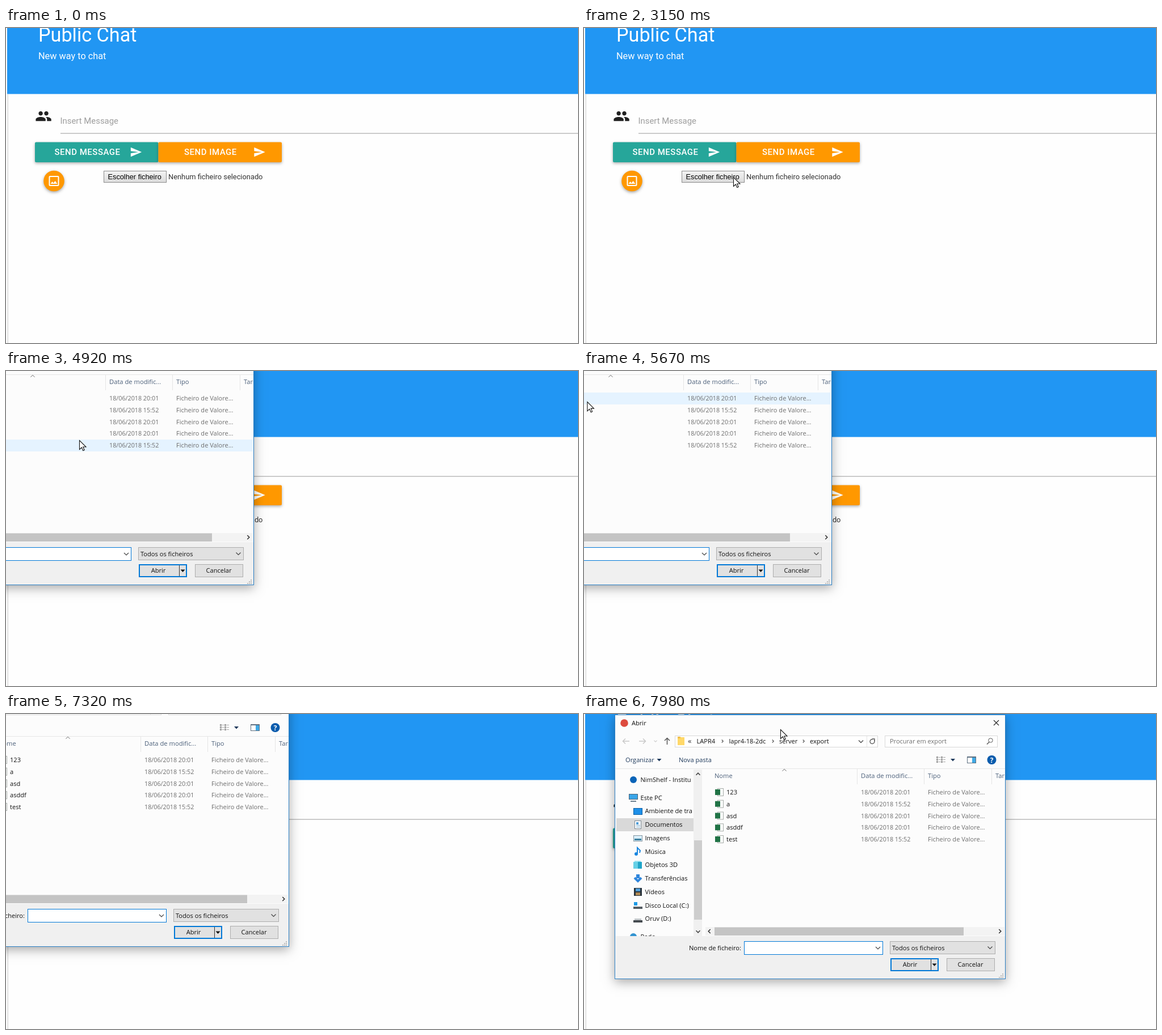
Recreate the animation shown at these times as an HTML page with a canvas. Size 1008 by 556 pixels, loop 8000 ms.

```html
<!DOCTYPE html>
<html lang="pt">
<head>
<meta charset="utf-8">
<title>Public Chat</title>
<style>
  html, body { margin: 0; width: 100%; height: 100%; overflow: hidden; background: #fefefe; }
  canvas { display: block; }
</style>
</head>
<body>
<canvas id="stage" width="1008" height="556"></canvas>
<script>
const ctx = document.getElementById('stage').getContext('2d');
const LOOP = 8000, STEP = 30;
const ROBOTO = 'Roboto, sans-serif', ARIAL = '"Liberation Sans", sans-serif', UI = '"Open Sans", sans-serif';
const ORANGE = '#ff9800', TEAL = '#26a69a', ACCENT = '#0078d7';

// Keys are [time, x, y]
const POINTER = [
  [90, 1006, 46], [210, 895, 108], [390, 706, 181], [450, 638, 213], [510, 584, 228],
  [570, 529, 241], [630, 481, 249], [750, 375, 258], [870, 308, 257], [900, 309, 245],
  [1020, 316, 229], [1200, 320, 220], [2610, 320, 220], [2730, 308, 238], [2880, 284, 256],
  [3150, 263, 263], [3390, 256, 266], [3480, 260, 267], [3750, 336, 289], [3960, 336, 289],
  [4440, 230, 187], [4620, 230, 187], [4920, 129, 122], [5160, 52, 88], [5400, 8, 70],
  [5430, 8, 70], [5640, 6, 52], [5850, 2, 67], [6480, 2, 67], [6810, 24, -22], [7080, 40, -63]
];
const WINDOW = [
  [7080, -306, -90], [7200, -288, -78], [7320, -244, -57], [7350, -230, -53], [7440, -164, -31],
  [7560, -90, -17], [7710, -28, -8], [7860, -1, -2], [7920, -1, -2], [7980, 0, 0]
];

const ICON = {
  send: new Path2D('M2 21L23 12 2 3v7l15 2-15 2z'),
  group: new Path2D('M16 11c1.66 0 3-1.34 3-3s-1.34-3-3-3-3 1.34-3 3 1.34 3 3 3zm-8 0c1.66 0 3-1.34 3-3s-1.34-3-3-3-3 1.34-3 3 1.34 3 3 3zm0 2c-2.33 0-7 1.17-7 3.5V19h14v-2.5c0-2.33-4.67-3.5-7-3.5zm8 0c-.3 0-.62 0-.97.05C16.2 13.9 17 15 17 16.5V19h6v-2.5c0-2.33-4.67-3.5-7-3.5z'),
  image: new Path2D('M5 3h14a2 2 0 0 1 2 2v14a2 2 0 0 1-2 2H5a2 2 0 0 1-2-2V5a2 2 0 0 1 2-2zM5 5v14h14V5zM14.1 11.9l-3 3.9L9 13.1 6 17h12z'),
  arrow: new Path2D('M.5.5V16.5L4.3 13L6.8 18.6L9.2 17.5L6.8 12H12Z'),
  hand: new Path2D('M-1.8 1.5Q0-1 1.8 1.5V8Q3.2 6.5 4.5 8.5Q6 7 7.3 9.2Q9 8 9.5 10.5V15Q9.5 18 8 20V23H-1.5V20.5L-6.5 14.5Q-7 12-4.5 12.5L-1.8 14.5Z')
};

const clamp = v => Math.max(0, Math.min(1, v));
const ramp = (t, from, to) => clamp((t - from) / (to - from));

function along(keys, t) {
  if (t <= keys[0][0]) return keys[0].slice(1);
  for (let i = 1; i < keys.length; i++) {
    const [t0, x0, y0] = keys[i - 1], [t1, x1, y1] = keys[i];
    if (t <= t1) {
      const p = (t - t0) / (t1 - t0);
      return [x0 + (x1 - x0) * p, y0 + (y1 - y0) * p];
    }
  }
  return keys[keys.length - 1].slice(1);
}

function text(s, x, y, color = '#111', size = 11.1, family = UI, weight = 400, align = 'left') {
  ctx.font = `${weight} ${size}px ${family}`;
  ctx.textAlign = align;
  ctx.fillStyle = color;
  ctx.fillText(s, x, y);
}

function box(x, y, w, h, fill, border) {
  if (fill) { ctx.fillStyle = fill; ctx.fillRect(x, y, w, h); }
  if (border) { ctx.strokeStyle = border; ctx.lineWidth = 1; ctx.strokeRect(x + .5, y + .5, w - 1, h - 1); }
}

function disc(x, y, r, fill) {
  ctx.fillStyle = fill;
  ctx.beginPath();
  ctx.arc(x, y, r, 0, 7);
  ctx.fill();
}

function line(color, width, ...p) {
  ctx.strokeStyle = color;
  ctx.lineWidth = width;
  ctx.beginPath();
  for (let i = 0; i < p.length; i += 2) ctx.lineTo(p[i], p[i + 1]);
  ctx.stroke();
}

// dir: 0 down, 1 left, 2 up, 3 right
function chevron(x, y, dir, r = 4, color = '#444', width = 1.2) {
  ctx.save();
  ctx.translate(x, y);
  ctx.rotate(dir * Math.PI / 2);
  line(color, width, -r, -r / 2, 0, r / 2, r, -r / 2);
  ctx.restore();
}

function caret(x, y, color = '#111') {
  ctx.fillStyle = color;
  ctx.beginPath();
  ctx.moveTo(x - 4, y - 2); ctx.lineTo(x + 4, y - 2); ctx.lineTo(x, y + 2.5);
  ctx.fill();
}

function icon(path, x, y, scale, color) {
  ctx.save();
  ctx.translate(x, y);
  ctx.scale(scale, scale);
  ctx.fillStyle = color;
  ctx.fill(path, 'evenodd');
  ctx.restore();
}

function shadow(alpha, blur, dy) {
  ctx.shadowColor = `rgba(0,0,0,${alpha})`;
  ctx.shadowBlur = blur;
  ctx.shadowOffsetY = dy;
}

function pageButton(x, label, labelX, color, lift) {
  ctx.save();
  shadow(.32 + .1 * lift, 5 + 6 * lift, 2 + 2 * lift);
  ctx.fillStyle = color;
  ctx.beginPath();
  ctx.roundRect(x, 201.5, 217.5, 35.5, 2);
  ctx.fill();
  ctx.restore();
  ctx.letterSpacing = '0.5px';
  text(label, labelX, 224.3, '#fff', 15, ROBOTO, 500);
  ctx.letterSpacing = '0px';
  icon(ICON.send, x + 167, 208, .92, '#fff');
}

function ripple(t) {
  const p = ramp(t, 1800, 2310);
  if (p <= 0 || p >= 1) return;
  ctx.save();
  ctx.beginPath();
  ctx.rect(268.5, 201.5, 217.5, 35.5);
  ctx.clip();
  disc(320, 222, 10 + 200 * (1 - (1 - p) ** 2), `rgba(255,255,255,${.4 * (1 - p)})`);
  ctx.restore();
}

function drawPage(t) {
  box(0, 0, 1008, 556, '#fefefe');
  box(2, 117, 2, 439, '#e6e6e6');
  box(4, 117, 1, 439, '#f5f5f5');
  box(2, 0, 1006, 116.5, '#2196f3');
  text('Public Chat', 57, 24, '#fff', 34.2, ROBOTO);
  text('New way to chat', 57, 55, '#fff', 16.3, ROBOTO);
  icon(ICON.group, 51.2, 140.8, 1.24, '#212121');
  text('Insert Message', 95.5, 169, '#9e9e9e', 14.9, ROBOTO);
  box(96, 185.5, 912, 1, '#9a9a9a');

  const lift = ramp(t, 960, 1200) - ramp(t, 2730, 2970);
  pageButton(51, 'SEND MESSAGE', 85.5, TEAL, 0);
  pageButton(268.5, 'SEND IMAGE', 314, ORANGE, lift);
  ripple(t);

  ctx.save();
  shadow(.35, 5, 2);
  disc(84.5, 270, 18.3, ORANGE);
  ctx.restore();
  icon(ICON.image, 72.5, 258, 1, '#fff');

  const face = ctx.createLinearGradient(0, 252, 0, 272);
  face.addColorStop(0, '#f4f4f4');
  face.addColorStop(1, '#dcdcdc');
  box(172, 252, 111, 21, face, '#8c8c8c');
  text('Escolher ficheiro', 179.5, 267, '#000', 12.75, ARIAL);
  text('Nenhum ficheiro selecionado', 286, 267, '#333', 12.85, ROBOTO);
}

const NAV = [
  ['NimShelf - Institu', () => disc(87, 116, 6, '#0a64b8')],
  ['Este PC', () => { box(79, 141, 16, 10, '#3aa5e8', '#4b6478'); box(82, 153, 10, 2, '#6b7f8e'); }],
  ['Ambiente de tra', () => box(87, 166, 16, 12, '#1e90e8', '#0c5fa5')],
  ['Documentos', () => { box(89, 188, 12, 15, '#fff', '#7d8a94'); box(92, 191, 4, 4, '#4a9bd8'); for (const y of [196, 199]) box(92, y, 7, 1, '#6ea3c8'); }],
  ['Imagens', () => { box(87, 214, 16, 11, '#d9effb', '#8796a0'); box(89, 220, 12, 3, '#3b7f9e'); }],
  ['Música', () => { disc(92, 247, 3, '#1b87e0'); line('#1b87e0', 2, 94, 247, 94, 236, 99, 241, 98, 245); }],
  ['Objetos 3D', () => { box(87, 261, 15, 12, '#20a5c9'); box(87, 261, 8, 12, '#65d0e6'); box(89, 259, 11, 2, '#a3e6f1'); }],
  ['Transferências', () => { box(92, 283, 6, 7, '#2f86dc'); line('#2f86dc', 4, 89, 289, 95, 295, 101, 289); }],
  ['Vídeos', () => { box(88, 307, 14, 14, '#29343d'); box(91, 308, 8, 5, '#4f9ed8'); box(91, 315, 8, 5, '#b08a55'); }],
  ['Disco Local (C:)', () => { box(88, 332, 6, 6, '#1d9be6'); box(87, 340, 16, 4, '#555d63'); }],
  ['Oruv (D:)', () => { box(89, 361, 12, 3, '#c3c8cb'); box(87, 364, 16, 4, '#454b50'); }],
  ['Rede', () => { disc(87, 393, 6, '#3293d0'); }]
];

function drawNav() {
  ctx.save();
  ctx.beginPath();
  ctx.rect(56, 98, 137, 294);
  ctx.clip();
  box(57, 184, 136, 23, '#d9d9d9');
  NAV.forEach(([label, draw], i) => {
    const y = i ? 147.5 + (i - 1) * 23.75 : 116;
    const root = i < 2 || i === 11;
    draw();
    text(label, root ? 99.5 : 107.5, (i === 11 ? 392.5 : y) + 4);
  });
  ctx.restore();
  box(193, 98, 15, 294, '#f0f0f0');
  box(194, 223, 14, 140, '#cdcdcd');
  chevron(201, 106, 2, 3.5, '#444', 1.6);
  chevron(201, 384, 0, 3.5, '#444', 1.6);
}

function drawToolbars() {
  disc(71, 16, 6.8, '#dd4b3e');
  text('Abrir', 84, 20.3);
  line('#222', 1.1, 722, 11, 731, 20);
  line('#222', 1.1, 731, 11, 722, 20);

  for (const [x, dir, color] of [[74, 1, '#c8c8c8'], [103, 3, '#c8c8c8'], [146.5, 2, '#555']]) {
    ctx.save();
    ctx.translate(x, 48);
    ctx.rotate(dir * Math.PI / 2);
    line(color, 1.5, 0, -6, 0, 5);
    line(color, 1.5, -4.5, 1, 0, 5.5, 4.5, 1);
    ctx.restore();
  }
  chevron(126, 48, 0, 2.5, '#d0d0d0');

  box(160, 38, 358, 21, '#fff', '#d9d9d9');
  box(165, 41, 12, 14, '#ffd869');
  box(165, 40, 5, 3, '#f0be48');
  text('«', 183, 51.5, '#333', 13);
  text('LAPR4', 198.5, 52);
  text('lapr4-18-2dc', 255.5, 52);
  text('server', 344, 52);
  text('export', 398, 52);
  for (const x of [244, 333, 387]) chevron(x, 48, 3, 2.5, '#555');
  chevron(488, 48.5, 0, 4, '#555', 1.5);
  box(498, 39, 1, 19, '#e3e3e3');
  ctx.strokeStyle = '#555';
  ctx.lineWidth = 1.3;
  ctx.beginPath();
  ctx.arc(508, 48.5, 4, -.6, 4.9);
  ctx.stroke();
  line('#555', 1.3, 508, 44, 512, 44, 512, 48);

  box(530, 38, 199, 21, '#fff', '#d9d9d9');
  text('Procurar em export', 539, 52, '#6d6d6d', 11);
  ctx.strokeStyle = '#555';
  ctx.beginPath();
  ctx.arc(716.5, 46.5, 3.7, 0, 7);
  ctx.stroke();
  line('#555', 1.5, 714, 49.5, 710, 53.5);

  text('Organizar', 73, 85, '#1e395b');
  caret(132.5, 81, '#1e395b');
  text('Nova pasta', 167, 85, '#1e395b');
  for (let r = 0; r < 3; r++) {
    for (const x of [621, 629]) box(x, 75 + r * 4, 3, 3, null, '#8a8a8a');
    box(625, 76 + r * 4, 3, 1, '#aaa');
    box(633, 76 + r * 4, 4, 1, '#aaa');
  }
  caret(650, 81, '#1e395b');
  box(675, 75, 16, 12, '#fff', '#5d6f80');
  box(675, 75, 16, 2, '#5d6f80');
  box(684, 77, 6, 9, '#3fa9e5');
  disc(718.5, 81, 8, '#0b5cad');
  text('?', 718.5, 85.5, '#fff', 12, UI, 700, 'center');
  box(56, 96, 686, 1, '#e6e6e6');
}

function drawList(hover) {
  const head = '#4c607a', dim = '#6d6d6d';
  text('Nome', 230, 113.3, head);
  text('Data de modific...', 488, 113.3, head, 11.2);
  text('Tipo', 606, 113.3, head);
  chevron(353, 99, 2, 3.5, '#666', 1);
  for (const x of [481, 599, 718]) box(x, 97, 1, 27, '#e5e5e5');
  ctx.save();
  ctx.beginPath();
  ctx.rect(718, 97, 23, 30);
  ctx.clip();
  text('Tamanho', 725, 113.3, head);
  ctx.restore();

  ['123', 'a', 'asd', 'asddf', 'test'].forEach((name, i) => {
    const y = 138 + i * 20.75;
    if (i === hover) box(211, Math.round(y - 10), 530, 21, '#e5f3ff');
    box(235, y - 7, 11, 14, '#fff', '#a5aba7');
    box(231, y - 5, 9, 10, '#217346');
    text(name, 251, y + 4);
    text(i % 3 === 1 ? '18/06/2018 15:52' : '18/06/2018 20:01', 488, y + 4, dim, 10.75);
    text('Ficheiro de Valore...', 606, y + 4, dim, 11.05);
  });

  box(214, 376, 527, 15, '#f3f3f3');
  box(230, 376.5, 439, 14.5, '#c4c4c4');
  chevron(221, 383.5, 1, 3.5, '#333', 1.6);
  chevron(733, 383.5, 3, 3.5, '#333', 1.6);
}

function drawFooter() {
  box(56, 392, 686, 75, '#f0f0f0');
  text('Nome de ficheiro:', 277, 416.5, '#111', 11.1, UI, 400, 'right');
  box(282, 401, 245, 24, '#fff', ACCENT);
  chevron(518, 413, 0, 4);
  box(539, 401, 186, 23, '#e1e1e1', '#adadad');
  text('Todos os ficheiros', 543, 416.5);
  chevron(715.5, 412.5, 0, 4);
  box(540, 431, 85, 23, '#e1e1e1', ACCENT);
  box(541, 432, 83, 21, null, ACCENT);
  text('Abrir', 574.5, 446.3, '#111', 11.1, UI, 400, 'center');
  box(611, 433, 1, 19, '#333');
  caret(617.5, 442.5);
  box(639, 431, 85, 23, '#e1e1e1', '#adadad');
  text('Cancelar', 681, 446.3, '#111', 11.1, UI, 400, 'center');
  for (let i = 0; i < 3; i++)
    for (let j = 0; j <= i; j++) box(737 - j * 3, 458 + i * 3, 2, 2, '#bbb');
}

function drawDialog(dx, dy, open, hover) {
  ctx.save();
  ctx.globalAlpha = open;
  ctx.translate(dx + 398, dy + 235);
  const s = .92 + .08 * open;
  ctx.scale(s, s);
  ctx.translate(-398, -235);
  ctx.save();
  shadow(.34, 18, 5);
  box(54, 1, 689, 467, '#fcfcfc');
  ctx.restore();
  drawToolbars();
  drawNav();
  drawList(hover);
  drawFooter();
  box(54, 1, 689, 467, null, '#2b7fc4');
  ctx.restore();
}

function drawTooltip(alpha) {
  if (alpha <= 0) return;
  ctx.save();
  ctx.globalAlpha = alpha;
  ctx.save();
  ctx.shadowOffsetX = 2;
  shadow(.55, 3, 2);
  box(-14, 99, 357, 49, '#fff');
  ctx.restore();
  box(-14, 99, 357, 49, null, '#767676');
  ['Tipo: Ficheiro de Valores Separados Por Vírgulas do Quortavel Grid', 'Tamanho: 92 bytes', 'Data de modificação: 18/06/2018 20:01']
    .forEach((s, i) => text(s, -8, 112.8 + i * 14.6, '#575757', 11));
  ctx.restore();
}

function drawPointer(x, y, hand) {
  ctx.save();
  ctx.translate(x, y);
  const shape = hand ? ICON.hand : ICON.arrow;
  ctx.fillStyle = '#fff';
  ctx.fill(shape);
  ctx.strokeStyle = '#111';
  ctx.lineWidth = 1.1;
  ctx.stroke(shape);
  if (hand) for (const fx of [1.8, 4.5, 7.3]) line('#111', 1, fx, 8, fx, 12);
  ctx.restore();
}

function render(t) {
  const [dx, dy] = along(WINDOW, t);
  const dragging = t >= 7080;
  const [x, y] = dragging ? [dx + 346, dy + 27] : along(POINTER, t);
  const open = ramp(t, 3930, 4200);
  const resting = t >= 5850 && t <= 6480;

  drawPage(t);
  if (open > 0) {
    const row = Math.floor((y - 38) / 20.75);
    const hover = t >= 4440 && !dragging && !resting ? row : -1;
    drawDialog(dx, dy, open, hover);
    drawTooltip(ramp(t, 5850, 6060) - ramp(t, 6510, 6750));
  }
  const overButton = x > 269 && x < 486 && y > 201 && y < 237;
  if (t >= 90) drawPointer(x, y, overButton && t < 3900);
}

const start = performance.now();
function tick() {
  const t = (performance.now() - start) % LOOP;
  render(Math.floor(t / STEP) * STEP);
  requestAnimationFrame(tick);
}
tick();
</script>
</body>
</html>
```
